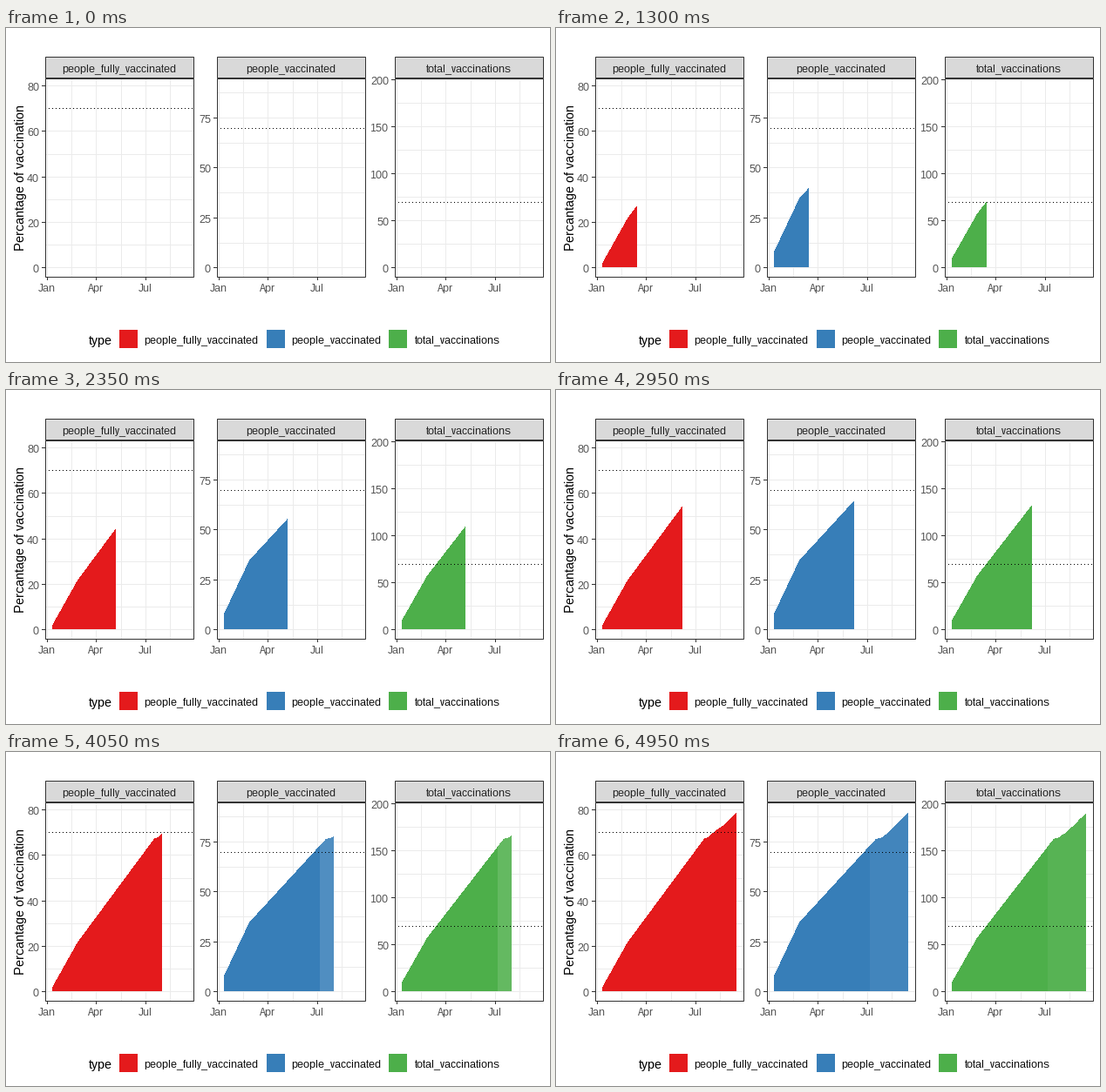
A matplotlib script that plays this animation: 624 px wide and 384 px high, repeating every 5000 ms.

```python
import math
import numpy as np
import matplotlib as mpl
import matplotlib.pyplot as plt
from matplotlib.animation import FuncAnimation
from matplotlib.colors import to_rgb
from matplotlib.patches import Polygon, Rectangle

W, H, DPI = 624, 384, 96
FRAMES, STEP = 100, 50
PX = 72 / DPI  # one pixel in points

# whole-pixel glyph advances without kerning
mpl.rcParams.update({
    "font.family": "Liberation Sans",
    "text.hinting": "native",
    "text.hinting_factor": 1,
    "text.kerning_factor": 6,
})

BORDER, GRID, STRIP, TICK_TEXT = "#333333", "#EBEBEB", "#D9D9D9", "#4D4D4D"
TOP, BOTTOM, ZERO = 58, 286, 275.7
PANEL_W = 170
GOAL = 70

# positions relative to a panel's left border
MONTHS = {"Jan": 2, "Apr": 58, "Jul": 115}
MID_MONTHS = (30, 87, 143)
KNOTS = np.array([8, 37, 125, 130, 133, 138, 142, 147, 155, 162])
START, END = KNOTS[0], KNOTS[-1]
TINT_X = 118

# name, left border, colour, pixels per unit, tick step, ticks, tinted tail, values
PANELS = [
    ("people_fully_vaccinated", 45, "#E41A1C", 2.613, 20, 5, False,
     [2, 21.8, 67.4, 68, 69.2, 71, 71.9, 73.3, 76.2, 78.9]),
    ("people_vaccinated", 242, "#377EB8", 2.2945, 25, 4, True,
     [8, 34.8, 76.6, 77, 77.6, 79.5, 81.2, 83.2, 87, 90]),
    ("total_vaccinations", 446, "#4DAF4A", 1.08, 50, 5, True,
     [10, 57.5, 163, 163.8, 166, 169, 172.5, 176.5, 184, 190.3]),
]
LEGEND = ((130, 158), (299, 327), (439, 469))  # key x, text x

fig = plt.figure(figsize=(W / DPI, H / DPI), dpi=DPI, facecolor="white")
ax = fig.add_axes([0, 0, 1, 1])
ax.set_xlim(0, W)
ax.set_ylim(H, 0)
ax.axis("off")


def line(x0, y0, x1, y1, color, z, **style):
    ax.plot([x0, x1], [y0, y1], color=color, lw=PX, zorder=z, snap=False,
            solid_capstyle="butt", dash_capstyle="butt", **style)


def hline(row, x0, x1, color, z, **style):
    line(x0, row + 0.5, x1, row + 0.5, color, z, **style)


def vline(col, y0, y1, color, z):
    line(col + 0.5, y0, col + 0.5, y1, color, z)


def box(x, y, w, h, face, edge, z):
    ax.add_patch(Rectangle((x + 0.5, y + 0.5), w, h, facecolor=face,
                           edgecolor=edge, lw=PX, zorder=z, snap=False))


def label(x, y, s, size=9, color="black", ha="left", **kw):
    ax.text(x, y, s, fontsize=size, color=color, ha=ha, va="baseline",
            zorder=6, **kw)


def area(color, z):
    patch = Polygon(np.zeros((3, 2)), closed=True, facecolor=color, lw=0,
                    antialiased=False, snap=False, zorder=z)
    return ax.add_patch(patch)


def lighten(color, amount):
    return [c + (1 - c) * amount for c in to_rgb(color)]


class Panel:
    def __init__(self, name, left, color, scale, step, ticks, tinted, values):
        self.left, self.color, self.scale = left, color, scale
        self.values = np.array(values)
        self.draw_frame(name, step, ticks)
        self.main = area(color, 3)
        self.tail = area(color, 3.5) if tinted else None

    def row(self, value):
        return math.floor(ZERO - value * self.scale)

    def draw_frame(self, name, step, ticks):
        left, right = self.left, self.left + PANEL_W
        for i in range(ticks):
            row = self.row(i * step)
            hline(row, left, right, GRID, 1)
            hline(row, left - 4, left, BORDER, 5)
            label(left - 7, row + 6, str(i * step), color=TICK_TEXT,
                  ha="right")
            mid = self.row((i + 0.5) * step)
            if mid > TOP:
                hline(mid, left, right, GRID, 1)
        for month, dx in MONTHS.items():
            vline(left + dx, TOP, BOTTOM, GRID, 1)
            vline(left + dx, BOTTOM, BOTTOM + 4, BORDER, 5)
            label(left + dx, 303, month, color=TICK_TEXT, ha="center")
        for dx in MID_MONTHS:
            vline(left + dx, TOP, BOTTOM, GRID, 1)
        hline(self.row(GOAL), left, right, "black", 4, linestyle=(0, (1, 3)))
        box(left, TOP, PANEL_W, BOTTOM - TOP, "none", BORDER, 5)
        box(left, 33, PANEL_W, 24, STRIP, BORDER, 5)
        label(left + PANEL_W / 2, 50, name, color="#1A1A1A", ha="center")

    def fill(self, patch, x0, front):
        """Shape the area as whole pixel columns from x0 up to the front."""
        cols = np.arange(x0, round(front))
        patch.set_visible(len(cols) > 0)
        if not len(cols):
            return
        tops = np.round(
            ZERO - np.interp(cols + 0.5, KNOTS, self.values) * self.scale)
        xs = np.column_stack([cols, cols + 1]).ravel()
        xs = np.concatenate([xs, [xs[-1], x0]]) + self.left
        ys = np.append(np.repeat(tops, 2), [275, 275])
        patch.set_xy(np.column_stack([xs, ys]))

    def update(self, front, tint):
        self.fill(self.main, START, front)
        if self.tail:
            self.fill(self.tail, TINT_X, front)
            self.tail.set_facecolor(lighten(self.color, tint))


panels = [Panel(*spec) for spec in PANELS]

label(21, 172.5, "Percantage of vaccination", size=11, ha="center",
      rotation=90, rotation_mode="anchor")
label(95, 364, "type", size=11)
for (key_x, text_x), (name, _, color, *_) in zip(LEGEND, PANELS):
    ax.add_patch(Rectangle((key_x, 347), 21, 21, facecolor=color, lw=0))
    label(text_x, 362, name)


def draw(i):
    front = START + (END - START) * i / (FRAMES - 1)
    tint = 0.095 + 0.004 * (89 - i)
    for panel in panels:
        panel.update(front, tint)
    return []


anim = FuncAnimation(fig, draw, frames=FRAMES, interval=STEP,
                     init_func=lambda: draw(0), repeat=True, repeat_delay=0,
                     blit=False)
plt.show()
```
